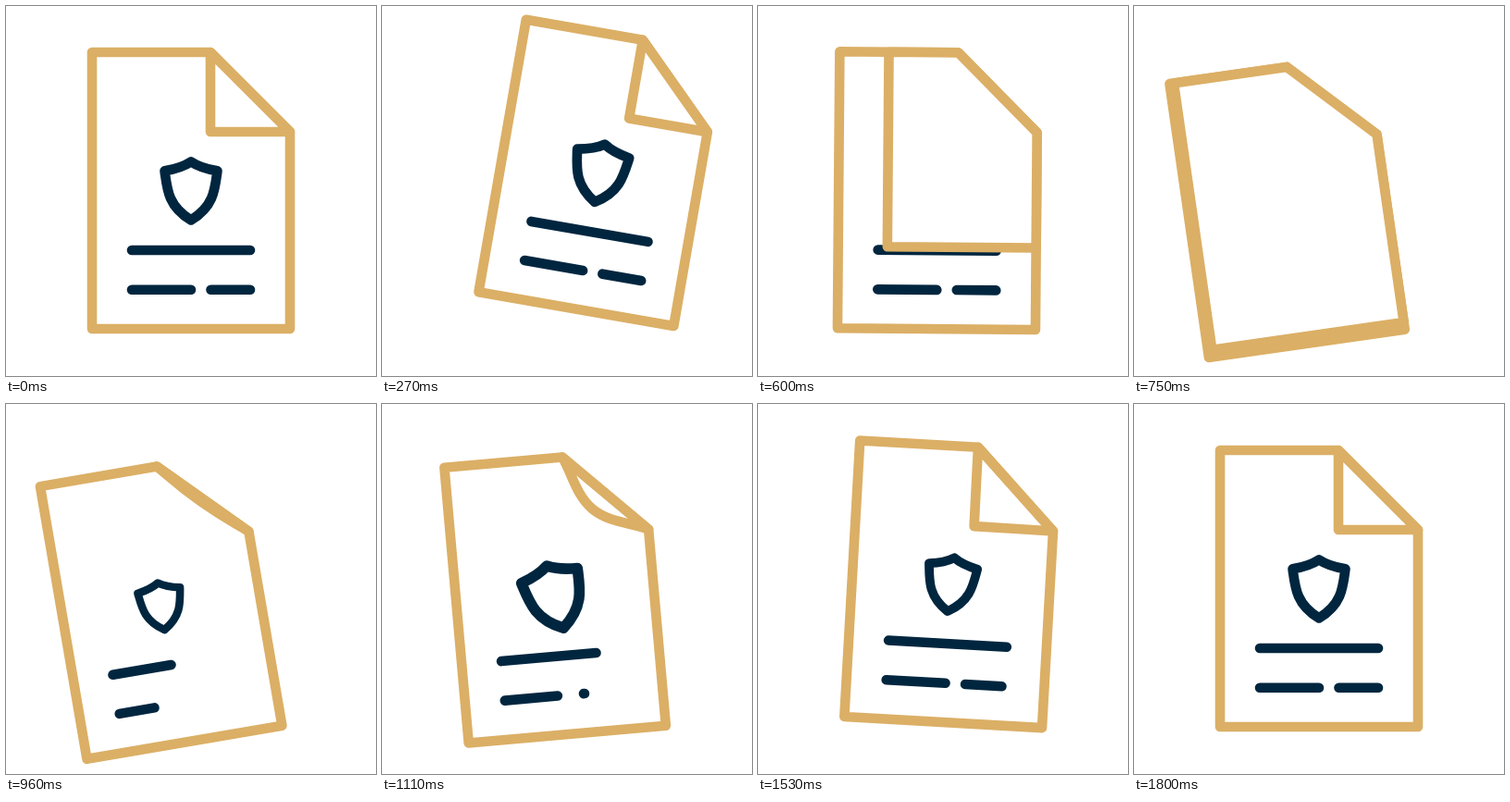
Animation of 400x400 px, one loop 3.83 s. Source, as an HTML page:

```html
<!DOCTYPE html>
<html lang="en">
<head>
<meta charset="utf-8">
<title>Protected document</title>
<style>
  html, body { margin: 0; width: 100%; height: 100%; overflow: hidden; background: #fff; }
  svg { display: block; width: 100%; height: 100%; }
  .gold { stroke: #dbaf65; }
  .navy { stroke: #00263f; }
</style>
</head>
<body>
<svg viewBox="0 0 400 400" fill="none" stroke-width="10.6" stroke-linecap="round" stroke-linejoin="round">
  <g id="page">
    <g class="navy">
      <path id="shield" d="M200 168.3C193 173 182 176.5 171.5 178.3C173 189 174 199 178 208C182 217 191 226 200 231.5C209 226 218 217 222 208C226 199 227 189 228.5 178.3C218 176.5 207 173 200 168.3Z"/>
      <path id="line1"/>
      <path id="line2"/>
      <path id="line3"/>
    </g>
    <g class="gold">
      <path d="M93 50H221L307 136V349H93Z"/>
      <path id="flap"/>
    </g>
  </g>
</svg>
<script>
const LOOP = 3830, END = 1800, STEP = 30, SWAP = 825;
const $ = id => document.getElementById(id);
const clamp = v => Math.max(0, Math.min(1, v));
const mix = (a, b, k) => a + (b - a) * k;

// Cubic bezier ease with handles (x1, 0) and (x2, 1)
function ease(x, x1, x2) {
  let lo = 0, hi = 1;
  for (let i = 0; i < 24; i++) {
    const s = (lo + hi) / 2, r = 1 - s;
    if (3 * x1 * s * r * r + 3 * x2 * s * s * r + s * s * s < x) lo = s; else hi = s;
  }
  return lo * lo * (3 - 2 * lo);
}

// Keys are [time, value, x1, x2]; the handles shape the way into the key
function track(t, keys) {
  if (t <= keys[0][0]) return keys[0][1];
  for (let i = 1; i < keys.length; i++) {
    const [t0, v0] = keys[i - 1], [t1, v1, x1 = 0.4, x2 = 0.6] = keys[i];
    if (t < t1) return mix(v0, v1, ease((t - t0) / (t1 - t0), x1, x2));
  }
  return keys[keys.length - 1][1];
}

const moveX = [[0, 0], [333, 38, 0.45, 0.55], [825, -37, 0.5, 0.5], [1405, 13, 0.48, 0.52], [1800, 0, 0.3, 0.45]];
const moveY = [[0, 0], [333, -20.5, 0.45, 0.55], [865, 20.5, 0.5, 0.5], [1400, -7.3, 0.45, 0.55], [1800, 0, 0.3, 0.45]];
const turn = [[0, 0], [300, 10.1], [910, -10, 0.6, 0.4], [1410, 5.3, 0.45, 0.55], [1800, 0, 0.25, 0.4]];
const sweep = [[333, 0], [825, 1, 0.5, 0.5]];
const curl = [[870, 0], [1600, 1, 0.3, 0.45]];
const pop = [[825, 0], [1110, 1.1, 0.12, 0.35], [1490, 0.92], [1800, 1]];
const wobble = [[825, 2], [930, 2], [1210, -14.5], [1500, 4], [1800, 0]];

const grow = (t, start, span, power) =>
  t < SWAP ? 1 : 1 - Math.pow(1 - clamp((t - start) / span), power);

function drawLine(id, x, y, length, k) {
  $(id).setAttribute("d", k > 0 ? `M${x} ${y}h${length * k}` : "");
}

// The old sheet's corner sweeps down to cover the page
function sweepPath(p) {
  const x = 221 - 128 * p, y = 136 + 213 * p;
  return `M221 50H${x}V${y}H307V136Z`;
}

// The new corner bends out of the diagonal into a sharp fold
function curlPath(q) {
  const cx = mix(264, 221, q), cy = mix(93, 136, q);
  const ax = mix(14, 0, q), ay = mix(14, 28, q), h = 25 * (1 - q);
  return `M221 50C${221 + ax} ${50 + ay} ${cx - h} ${cy - h} ${cx} ${cy}` +
    `C${cx + h} ${cy + h} ${307 - ay} ${136 - ax} 307 136Z`;
}

function render(t) {
  const fresh = t >= SWAP;
  $("page").setAttribute("transform",
    `translate(${track(t, moveX)} ${track(t, moveY)}) rotate(${track(t, turn)} 200 200)`);

  const size = fresh ? track(t, pop) : 1, tilt = fresh ? track(t, wobble) : 0;
  const shield = $("shield");
  shield.setAttribute("transform",
    `translate(200 200) rotate(${tilt}) scale(${size}) translate(-200 -200)`);
  shield.setAttribute("visibility", size > 0.01 ? "visible" : "hidden");

  drawLine("line1", 136, 264, 128, grow(t, 820, 780, 3.5));
  drawLine("line2", 136, 306.7, 64, grow(t, 820, 610, 3.5));
  drawLine("line3", 221.5, 306.7, 42.5, grow(t, 1103, 581, 2));

  const flap = $("flap");
  flap.setAttribute("d", fresh ? curlPath(track(t, curl)) : sweepPath(track(t, sweep)));
  flap.setAttribute("fill", fresh ? "none" : "#fff");
}

const begin = performance.now();
function tick() {
  const t = (performance.now() - begin) % LOOP;
  render(Math.min(END, Math.floor(t / STEP) * STEP));
  requestAnimationFrame(tick);
}
tick();
</script>
</body>
</html>
```
